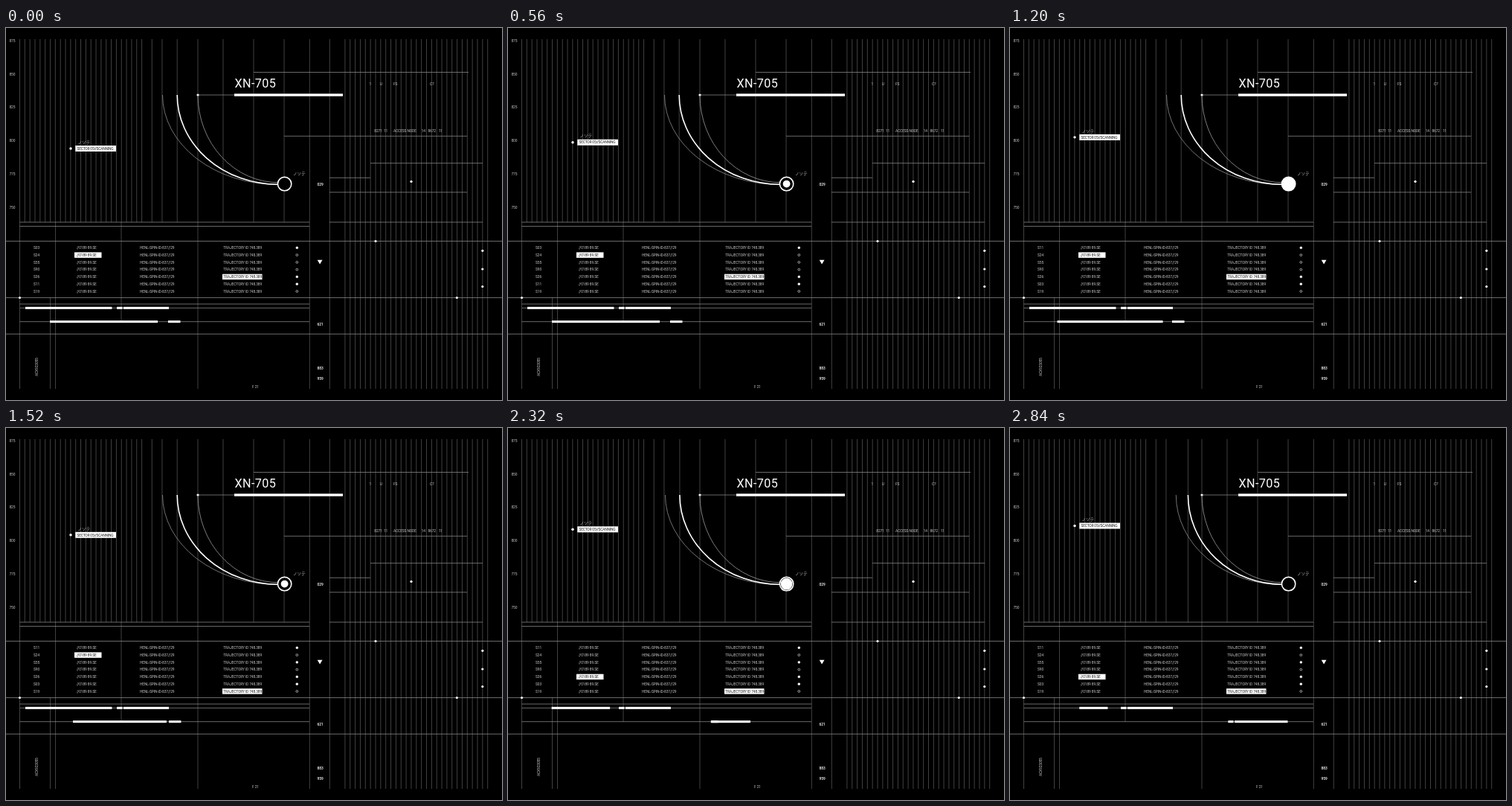
These frames come from a looping animation (667x500 px, 2880 ms). An HTML page:

```html
<!DOCTYPE html>
<html lang="en">
<head>
<meta charset="utf-8">
<title>Scanner panel</title>
<style>
  html, body { margin: 0; width: 100%; height: 100%; overflow: hidden; background: #000; }
  svg { display: block; width: 100vw; height: 100vh; }
  text { font: 4.9px Roboto, "Open Sans", sans-serif; letter-spacing: -.13px; fill: #c4c4c4; }
  text.bold { font-weight: 500; fill: #fff; letter-spacing: 0; }
  text.ink { fill: #222; }
  text.title { font-size: 16.2px; letter-spacing: .4px; fill: #fff; }
  text.kana { font: 5.6px "Noto Sans CJK JP", "Noto Sans CJK", sans-serif; letter-spacing: -.1px; }
</style>
</head>
<body>
<svg id="stage" viewBox="0 0 667 500"></svg>
<script>
const LOOP = 2880, STEP = 40;
const stage = document.getElementById('stage');

function add(tag, attrs, parent = stage) {
  const node = document.createElementNS('http://www.w3.org/2000/svg', tag);
  set(node, attrs);
  parent.appendChild(node);
  return node;
}
function set(node, attrs) {
  for (const k in attrs) node.setAttribute(k, attrs[k]);
}
const vline = (x, y1 = 15, y2 = 485) =>
  add('line', { x1: x, x2: x, y1, y2, stroke: '#525252', 'stroke-width': .8 });
const hline = (y, x1, x2) =>
  add('line', { x1, x2, y1: y, y2: y, stroke: '#8c8c8c', 'stroke-width': .75 });
const dot = (x, y, r = 1.6, parent) => add('circle', { cx: x, cy: y, r, fill: '#fff' }, parent);
const rect = (x, y, width, height, parent) => add('rect', { x, y, width, height, fill: '#fff' }, parent);
// y is the middle of the capitals
function text(str, x, y, cls = '', parent) {
  const node = add('text', { x, y: y + 1.75, class: cls }, parent);
  node.textContent = str;
  return node;
}

// Vertical grid
const leftX = k => 18.5 + k * 6.837;
for (let k = 1; k <= 24; k++) vline(leftX(k), 15, 261);
[26, 28, 40, 46, 52].forEach(k => vline(leftX(k), 15, 261));
const guide = vline(230, 15, 261);
[18.5, 258, 408.3, 435.3].forEach(x => vline(x));
vline(59.5, 362, 485);
vline(66.5, 261, 485);
vline(155, 261, 395);
for (let k = 0; k <= 28; k++) vline(455.9 + k * 6.85);

// Horizontal rules
[286.5, 362.5, 411.3].forEach(y => hline(y, 0, 667));
[261, 266.5, 371, 376.3, 394.7].forEach(y => hline(y, 18.5, 408));
[[59.5, 333, 622], [145.3, 374, 620], [181.7, 490, 641], [201.3, 435, 490],
 [220.8, 435, 620], [261, 435, 641], [90, 258, 453]].forEach(a => hline(...a));
rect(307, 88.3, 146, 3.4);

[[497, 286.5], [545, 206.3], [640.8, 299.3], [640.8, 324], [640.8, 347.5],
 [606.3, 362.5], [18.5, 362.5], [258, 90]].forEach(p => dot(...p));
add('path', { d: 'M418.7 311.7h6.8l-3.4 5.8z', fill: '#fff' });

// Fixed lettering
const title = text('XN-705', 307.5, 78.6, 'title');
for (let i = 0; i < 6; i++) text(875 - 25 * i, 4.5, 17 + i * 44.75);
[['1', 488.5], ['U', 502.7], ['FS', 521], ['C7', 570]].forEach(([s, x]) => text(s, x, 75));
[['8271', 495.3], ['11', 508], ['ACCESS NODE', 521], ['14', 558.7], ['8672', 567.5], ['11', 581.7]]
  .forEach(([s, x]) => text(s, x, 138.5));
[['029', 210], ['621', 398.3], ['883', 457], ['959', 471]].forEach(([s, y]) => text(s, 418.5, y, 'bold'));
text('F 21', 331, 482);
set(text('ACX923055', 0, 0), { transform: 'translate(41.6 468) rotate(-90)' });
text('ノソテ', 386, 196.6, 'kana');

// Arcs and target ring
const arc = (stroke, width) => add('path', { fill: 'none', stroke, 'stroke-width': width });
const outer = arc('#b0b0b0', .65), middle = arc('#fff', 1.6), inner = arc('#c0c0c0', .65);
const curve = (node, x, endX, endY) =>
  set(node, { d: `M${x} 90A${endX - x} ${endY - 90} 0 0 0 ${endX} ${endY}` });
curve(inner, 258, 367, 207.8);
add('circle', { cx: 374.6, cy: 209.6, r: 9.2, fill: '#000', stroke: '#fff', 'stroke-width': 1.6 });
const pulse = dot(374.6, 209.6, 0);

// Table
const rowY = i => 295.4 + i * 9.75;
const mark2 = rect(92, 0, 36.5, 7.4), mark4 = rect(291, 0, 53.5, 7.4);
const ids = ['S03', 'S24', 'S55', 'S90', 'S36', 'S11', 'S19'];
const rows = ids.map((id, i) => {
  const y = rowY(i);
  const row = {
    id: text(id, 37, y),
    code: text('//0189 89.SE', 95, y),
    track: text('TRAJECTORY ID 748.389', 292.3, y),
    lamp: add('circle', { cx: 391.3, cy: y, r: 1.4, stroke: '#fff', 'stroke-width': .6 })
  };
  text('HENL-SPIN-ID-837//29', 180, y);
  return row;
});

// Progress bars
const bar = y => rect(0, y, 0, 3);
const barTop = bar(374.8), barA = bar(393.2), barB = bar(393.2);
rect(149, 374.8, 7.6, 3);
rect(157.8, 374.8, 61.2, 3);

// Scanning tag
const tag = add('g', {});
dot(87, 0, 1.7, tag);
rect(93.3, -4, 54.7, 8, tag);
text('SECTOR 05//SCANNING', 95.5, 0, 'ink', tag).style.letterSpacing = '-.2px';
text('ノソテ', 96.5, -8, 'kana', tag);

const clamp = u => Math.min(1, Math.max(0, u));
const wave = u => (1 - Math.cos(Math.PI * clamp(u))) / 2;
function cubic(u) {
  u = clamp(u);
  return u < .5 ? 4 * u ** 3 : 1 - 4 * (1 - u) ** 3;
}
const move = (t, from, to, start, length) => from + (to - from) * cubic((t - start) / length);
const span = (node, a, b) => set(node, { x: a, width: Math.max(0, b - a) });

function render(t) {
  const s = t / 1000;
  const y = 162 - 9.2 * s - 4.4 * (1 - Math.exp(-s / .45));
  set(tag, { transform: `translate(0 ${y.toFixed(2)})` });

  const p = t % 960;
  set(pulse, { r: 9 * (p < 240 ? wave(p / 240) : 1 - wave((p - 240) / 680)) });

  const shift = Math.max(0, (t - 1930) * .00257) ** 3;
  const mid = 230.2 + .72 * shift;
  curve(outer, 210.5 + shift, 366, 210.5);
  curve(middle, mid, 366, 210.3);
  set(guide, { x1: mid, x2: mid });

  span(barTop, move(t, 26, 96, 1463, 1754), move(t, 142.5, 131, 1463, 1754));
  span(barA, move(t, 59, 302.3, 841, 2142), move(t, 204, 381, 875, 2520));
  span(barB, move(t, 218, 294, 1244, 1829), move(t, 234.5, 301.2, 1244, 1829));

  const swapped = t >= 960;
  const pick2 = t < 1920 ? 1 : 4;
  const late = t >= 1280;
  const pick4 = late ? 6 : 4;
  set(mark2, { y: rowY(pick2) - 3.7 });
  set(mark4, { y: rowY(pick4) - 3.7 });
  rows.forEach((row, i) => {
    const n = swapped && (i === 0 || i === 5) ? 5 - i : i;
    row.id.textContent = ids[n];
    set(row.code, { class: i === pick2 ? 'ink' : '' });
    set(row.track, { class: i === pick4 ? 'ink' : '' });
    const on = i === 0 || i === 4 || i === 5 || (i === 2 && late);
    set(row.lamp, { fill: on ? '#fff' : '#000' });
  });
}

// Baseline of the large heading
set(title, { y: 80 });

const begin = performance.now();
function tick() {
  const t = (performance.now() - begin) % LOOP;
  render(Math.floor(t / STEP) * STEP);
  requestAnimationFrame(tick);
}
render(0);
requestAnimationFrame(tick);
</script>
</body>
</html>
```
